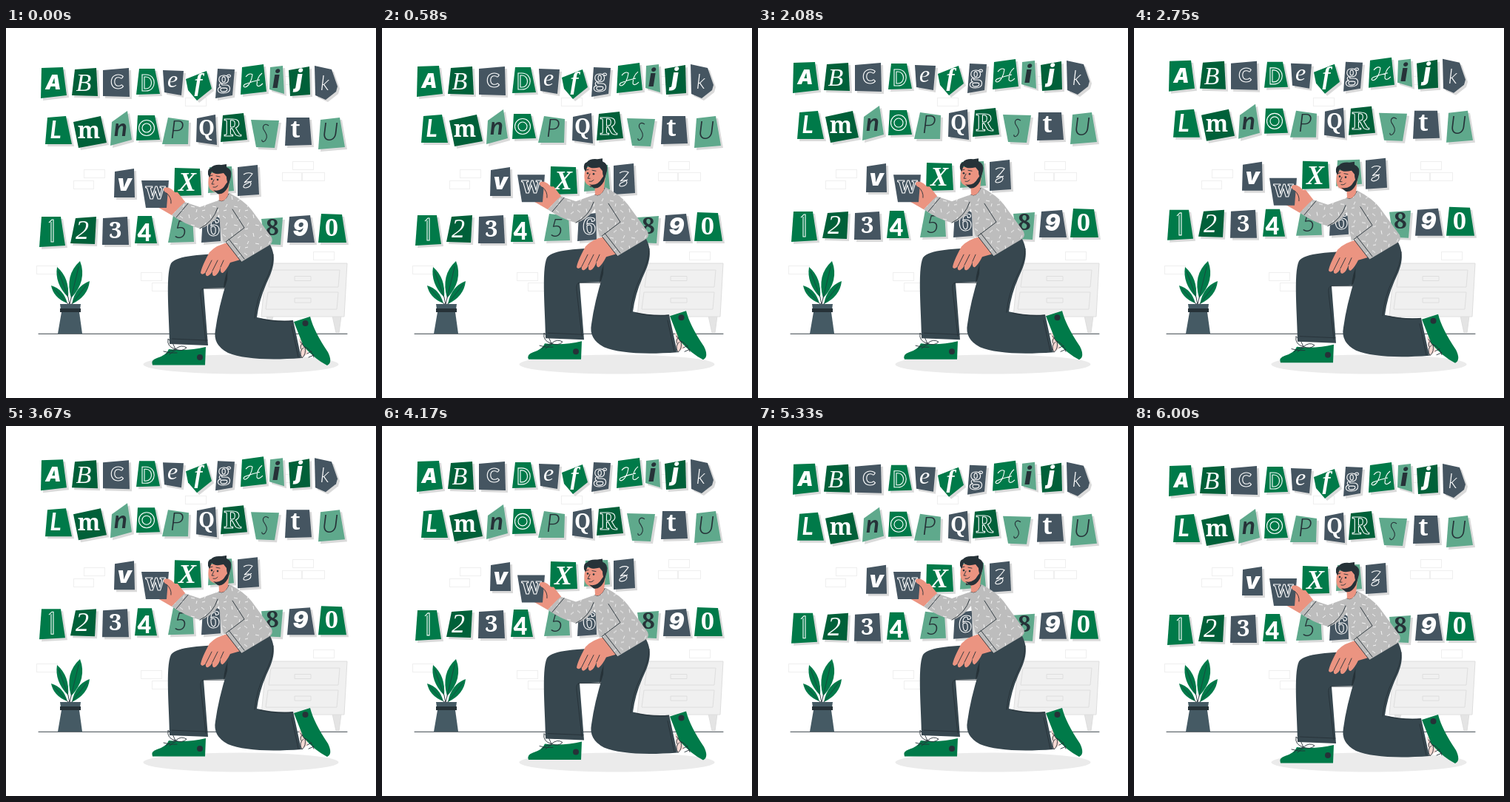
Animation of 500x500 px, one loop 6040 ms. Source, as an HTML page:

```html
<!DOCTYPE html>
<html lang="en">
<head>
<meta charset="utf-8">
<title>Cut-out alphabet</title>
<style>
html, body { margin: 0; width: 100%; height: 100%; overflow: hidden; background: #fff }
svg { display: block; width: 100vw; height: 100vh }
text { text-anchor: middle; fill: currentColor }
.heavy { font-family: Inter, sans-serif; font-weight: 900; font-style: italic }
.black { font-family: Lato, sans-serif; font-weight: 900 }
.slant { font-family: Lato, sans-serif; font-weight: 700; font-style: italic }
.thin { font-family: Lato, sans-serif; font-weight: 300; font-style: italic }
.pen { font-family: "Liberation Serif", serif; font-style: italic }
.brush { font-family: "Liberation Serif", serif; font-weight: 700; font-style: italic }
.serif { font-family: "Noto Serif", serif; font-weight: 700 }
.line { fill: none; stroke: currentColor; stroke-width: 1.1 }
.ink { fill: none; stroke: #263238; stroke-width: .9; stroke-linecap: round; stroke-linejoin: round }
.brick { fill: none; stroke: #efefef }
.skin { fill: #eb9481 }
.pants { fill: #37474f }
.green { fill: #007a49 }
.dark { fill: #263238 }
</style>
</head>
<body>
<svg viewBox="0 0 500 500">
  <defs>
    <pattern id="knit" width="29" height="25" patternUnits="userSpaceOnUse">
      <rect width="29" height="25" fill="#bdbdbd"/>
      <path d="M3 4l4 3M15 2l1 5M23 9l4-3M9 13l-2 4M18 16l5 1M4 22l4-1M26 20l-1 4" stroke="#f3f3f3" fill="none"/>
    </pattern>
  </defs>
  <g id="bricks"></g>
  <path class="ink" d="M44 413.3H461"/>
  <g fill="#f0f0f0" stroke="#dedede">
    <path d="M441 389h12l-3 23h-4zM352 389h9l-2 8h-5z" fill="#e4e4e4"/>
    <path d="M352 318H461L457 390H345Z"/>
    <path d="M358 327H451L449 350H355ZM354 357H449L447 380H351ZM390 335.500h22v6h-22zM390 365h22v6h-22z"/>
  </g>
  <g id="plant"></g>
  <path d="M73 373H101L100 380H74Z" fill="#455a64"/>
  <path d="M75 384H99L103 413H70Z" fill="#455a64"/>
  <path class="dark" d="M73 379H101V384H73Z"/>
  <ellipse cx="317.500" cy="454.500" rx="132" ry="13" fill="#ebebeb"/>
  <g id="cards"></g>
  <g id="man">
    <path d="M396 420L404 420L408 440L399 446Z" fill="#f4d8d2"/>
    <path class="green" d="M389 397L411 390Q416 410 435 438Q442 452 434 456Q418 448 402 430Z"/>
    <circle class="dark" cx="404.500" cy="399" r="4"/>
    <path class="ink" d="M402 432q-7 5-2 14q6-5 4-15q9 4 12 14M398 424l6 8M399 434q-3-4 2-8M407 440l6-3M409 445l7-3"/>
    <path class="green" d="M220 434Q245 437 270 431L269 455.500H198Q195 449 204 446Q217 442 220 434Z"/>
    <circle class="dark" cx="262" cy="445" r="4"/>
    <path class="ink" d="M229 434q-12-3-10-14q8 6 10 14q8-7 15-2q-6 6-15 2M216 441q6-6 13-7M221 441q5-5 9-6M213 437q9 3 18 2"/>
    <path class="pants" d="M310 304C262 306 232 307 223 318C215 334 221 395 221 427L273 429L267 352L296 351Q330 345 330 306Z"/>
    <path class="dark" d="M294 352Q295 335 302 322L299 345Z"/>
    <path class="pants" d="M300 312L356 291C368 312 359 330 352 345Q342 368 339 391Q365 397 388 395L399 446Q330 451 300 439Q279 428 283 408Q287 378 299 340Z"/>
    <path class="ink" d="M296 352H267Q262 352 263 362L270 424M224 420L272 422M361 306Q361 322 350 343Q338 367 336 392M344 393Q365 398 387 396M386 403L395 445"/>
    <path class="skin" d="M303 289Q284 293 275 303Q264 323 263 331Q265 335 270 330Q269 336 273 335Q277 333 279 328Q278 336 282 335Q287 333 290 323Q289 332 293 331Q298 327 303 317L317 313Z"/>
    <path class="ink" d="M270 330L278 314M279 328L286 314M290 323L294 314"/>
    <path class="skin" d="M242 235L232 222L219 222L212 236Q202 237 203 241Q212 246 224 253Z"/>
    <path d="M281 252L288 242L290 258Z" fill="#fff"/>
    <path d="M287 233L302 223Q323 234 332 246L359 283Q362 290 355 294L318 316L297 289L294 291Q289 268 288 252Q276 268 262 271Q243 266 224 253L241 235L262 242Z" fill="url(#knit)"/>
    <path class="ink" d="M306 245L322 270L297 289L318 316M262 271Q280 262 286 243M246 237L230 256M301 285L322 312M288 233Q295 237 301 224"/>
    <path class="skin" d="M287 214L302 207L300 226Q295 236 288 233Z"/>
    <path class="skin" d="M275 196Q271 214 277 219Q286 226 296 218L303 205Q303 198 297 194Z"/>
    <path class="dark" d="M280 219Q291 222 297 211L303 203L300 215Q294 226 286 224Z"/>
    <path class="dark" d="M273 198Q272 190 277 189Q281 184 291 185L298 184L298 188Q306 191 304 201L301 211Q298 208 298 201L294 196Q282 199 278 194L275 202Z"/>
    <circle class="dark" cx="278" cy="204" r="1.300"/>
    <circle class="dark" cx="286" cy="205" r="1.300"/>
    <path class="ink" d="M281 205l-3 6h3M280 215q4 1 6-2M275 200l4-1M284 200l5 1"/>
    <g id="held"></g>
    <path class="skin" d="M242 235L224 218Q217 213 213 217Q212 220 217 223Q222 230 224 240L230 245Z"/>
    <path class="ink" d="M217 223Q224 229 223 237"/>
  </g>
</svg>
<script>
const $ = id => document.getElementById(id);
const add = (id, markup) => $(id).insertAdjacentHTML('beforeend', markup);
const GREEN = '#007a49', DEEP = '#006039', MINT = '#5fa98c', SLATE = '#455561';

// A paper cutting with a flat shadow and one glyph on it
function card(shape, fill, glyph, home = 'cards') {
  add(home, `<g color="${fill === MINT ? '#263238' : '#fff'}">
    <polygon points="${shape}" fill="#dadada" transform="translate(3 3)"/>
    <polygon points="${shape}" fill="${fill}"/>${glyph}</g>`);
}
const type = (ch, style, size, x, y) =>
  `<text class="${style}" font-size="${size}" x="${x}" y="${y}">${ch}</text>`;
const drawn = d => `<path class="line" d="${d}"/>`;

card('48,54 77,53 82,91 47,95', GREEN, type('A', 'heavy', 27, 64, 83));
card('93,56 122,54 124,92 89,91', DEEP, type('B', 'pen', 34, 105, 85));
card('131,57 166,54 167,93 131,92', SLATE, type('C', 'black line', 26, 150, 82));
card('180,55 201,55 208,89 176,90', GREEN, drawn('M184 63h5c15 0 15 22 0 22h-5zM187 66h2c10 0 10 16 0 16h-2z'));
card('212,57 240,58 237,91 214,87', SLATE, type('e', 'pen', 32, 225, 80));
card('243,69 271,58 278,82 258,98 246,84', GREEN, type('f', 'brush', 33, 260, 85));
card('286,55 309,56 306,91 283,95', SLATE, type('g', 'serif line', 31, 295, 81));
card('319,53 348,49 352,86 317,90', GREEN, drawn('M324 66q5-6 9-3c-1 8-5 16-10 17q-4-1 0-4q10-4 20-6M346 61c-5 4-7 11-7 16q2 4 8-2'));
card('357,53 374,51 376,89 356,83', MINT, type('i', 'heavy', 32, 365, 81));
card('382,57 410,52 411,90 384,92', DEEP, type('j', 'heavy', 32, 396, 80));
card('417,51 440,56 448,79 446,86 432,97 418,91', SLATE, type('k', 'thin', 27, 431, 84));

card('56,121 81,119 89,157 53,157', GREEN, type('L', 'slant', 32, 67, 149));
card('91,127 128,119 136,155 98,162', DEEP, type('m', 'serif', 31, 112, 149));
card('143,127 164,112 170,151 141,159', MINT, type('n', 'slant', 33, 155, 146));
card('178,118 201,118 208,151 176,152', GREEN, '<g class="line"><circle cx="190" cy="135" r="10.500"/><circle cx="190" cy="135" r="6"/></g>');
card('219,121 247,125 246,157 211,157', MINT, type('P', 'thin', 34, 231, 149));
card('258,122 283,117 285,158 257,154', SLATE, type('Q', 'serif', 28, 271, 145));
card('293,118 321,115 326,151 290,154', DEEP, type('R', 'serif line', 33, 306, 146));
card('331,124 369,125 363,162 338,161', MINT, drawn('M355 132c-5-4-9 0-7 5 4 6 6 10 3 14-2 4-6 3-5 0'));
card('379,121 410,121 413,158 377,159', SLATE, type('t', 'serif', 33, 391, 148));
card('425,124 451,121 458,161 422,164', MINT, type('U', 'thin', 34, 438, 152));

card('147,194 173,190 174,229 146,229', SLATE, type('v', 'heavy', 31, 160, 220));
card('228,189 262,190 264,226 227,227', GREEN, type('X', 'brush', 36, 245, 220));
card('275,188 305,187 308,220 273,223', MINT, type('y', 'pen', 30, 290, 211));
card('313,188 340,185 342,225 313,227', SLATE, drawn('M321 198q6-4 12-1q-5 7-11 12q8-3 9 1q0 5-7 6q-5 0-2-4l10-5'));

card('48,255 74,255 80,294 45,296', GREEN, drawn('M58 263l4-4h2v30h-3v-27'));
card('94,257 122,255 120,292 87,291', DEEP, type('2', 'pen', 36, 103, 285));
card('131,257 164,255 166,293 130,293', SLATE, type('3', 'serif', 31, 148, 284));
card('178,254 197,254 204,291 174,291', GREEN, type('4', 'black', 32, 187, 288));
card('226,253 252,256 254,289 219,290', MINT, type('5', 'thin', 33, 236, 284));
card('266,255 289,252 290,288 264,290', SLATE, type('6', 'serif line', 33, 280, 281));
card('345,258 374,256 371,293 350,292', MINT, type('8', 'serif', 31, 360, 280));
card('383,255 411,253 417,290 380,290', SLATE, type('9', 'heavy', 31, 398, 281));
card('426,251 454,252 460,290 422,290', GREEN, type('0', 'serif', 32, 440, 281));
card('183,206 220,206 217,243 189,243', SLATE, type('w', 'serif line', 31, 202, 231), 'held');
$('held').querySelector('polygon').remove();

const brick = (x, y, w = 28) =>
  add('bricks', `<rect class="brick" x="${x}.5" y="${y}.5" width="${w}" height="11"/>`);
brick(105, 191); brick(91, 206, 27);
brick(387, 180); brick(373, 195, 26); brick(400, 195, 30);
brick(242, 94); brick(376, 65);
brick(41, 321); brick(182, 330); brick(197, 344);
brick(415, 302);

// Leaf from (bx, by) to (tx, ty), bulging w to both sides
function leaf(bx, by, tx, ty, w) {
  const dx = tx - bx, dy = ty - by, n = Math.hypot(dx, dy);
  const side = s => `${bx + dx * .55 - s * w * dy / n} ${by + dy * .55 + s * w * dx / n}`;
  add('plant', `<path class="ink" d="M86 374L${bx} ${by}"/>
    <path class="green" d="M${bx} ${by}Q${side(1)} ${tx} ${ty}Q${side(-1)} ${bx} ${by}"/>
    <path class="ink" stroke-opacity=".7" d="M${bx} ${by}L${bx + dx * .85} ${by + dy * .85}"/>`);
}
leaf(84, 364, 69, 323, 11);
leaf(83, 372, 61, 348, 9);
leaf(88, 365, 100, 315, 16);
leaf(89, 373, 113, 342, 11);

const LOOP = 6040, STEP = 1000 / 24;
const bob = (t, period) => -10 * (1 - Math.abs(1 - 2 * (t / period % 1)));
const lift = (id, y) => $(id).setAttribute('transform', `translate(0 ${y})`);

function draw() {
  const t = Math.floor((performance.now() % LOOP + 5) / STEP) * STEP;
  lift('cards', bob(t, 6000));
  lift('man', bob(t, 1500));
  requestAnimationFrame(draw);
}
draw();
</script>
</body>
</html>
```
